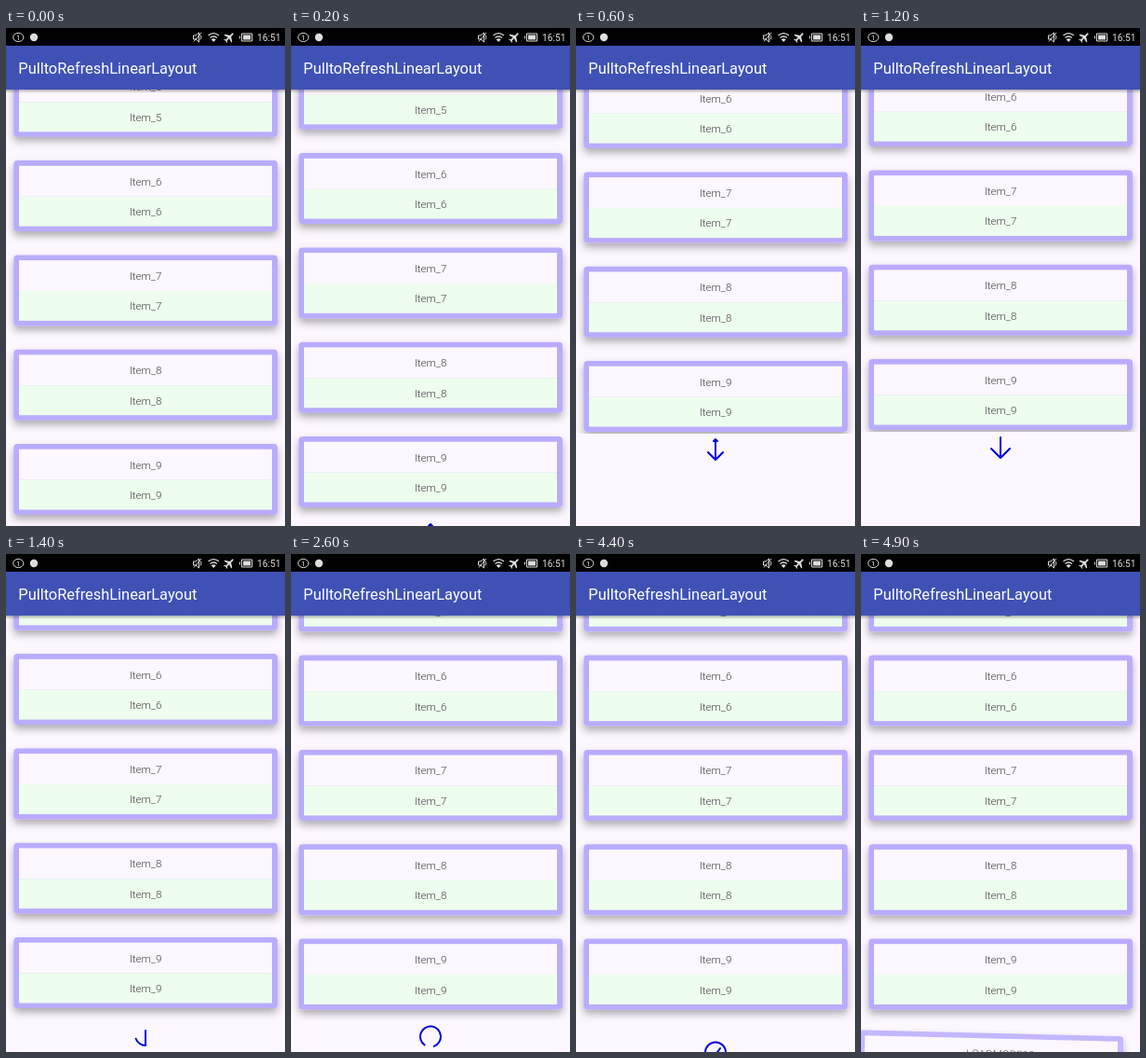
An HTML page that plays this animation: 300 px wide and 534 px high, repeating every 5 s.

```html
<!DOCTYPE html>
<html lang="en">
<head>
<meta charset="utf-8">
<title>Pull to load more</title>
<style>
  html, body { margin: 0; width: 100%; height: 100%; overflow: hidden; background: #fdf8ff; }
  svg { display: block; width: 100%; height: 100%; }
  text { font-family: Roboto, "Open Sans", sans-serif; }
  .item { font-size: 11.67px; font-weight: 300; fill: #444; text-anchor: middle; }
  .ink { fill: none; stroke: #0000dc; stroke-width: 2; stroke-linecap: round; stroke-linejoin: round; }
</style>
</head>
<body>
<svg viewBox="0 0 300 534">
  <defs>
    <filter id="cardShadow" x="-10%" y="-25%" width="120%" height="160%">
      <feDropShadow dx="0" dy="4.5" stdDeviation="4" flood-color="#000" flood-opacity=".32"/>
    </filter>
    <linearGradient id="barShadow" x2="0" y2="1">
      <stop stop-color="#000" stop-opacity=".3"/>
      <stop offset="1" stop-color="#000" stop-opacity="0"/>
    </linearGradient>
  </defs>
  <rect width="300" height="534" fill="#fdf8ff"/>
  <g id="list"></g>
  <g id="footer">
    <rect width="300" height="140" fill="#fdf8ff"/>
    <path id="mark" class="ink" transform="translate(150 17)"/>
  </g>

  <rect y="66" width="300" height="4" fill="url(#barShadow)"/>
  <rect y="19" width="300" height="47" fill="#3f51b5"/>
  <text x="13.3" y="49" font-size="16.4" fill="#fff">PulltoRefreshLinearLayout</text>

  <rect width="300" height="19" fill="#000"/>
  <g fill="none" stroke="#ddd">
    <ellipse cx="13.3" cy="10" rx="5.6" ry="4.6"/>
    <path d="M201.5 8h2.5l3.5-3v10l-3.5-3h-2.5zM209 7.5q2 2.500 0 5M202 14.500l8-9.500"/>
    <path d="M217.500 8q5.700-4.700 11.400 0M219.500 10.500q3.700-3 7.400 0" stroke-width="1.300"/>
    <path d="M253.500 6h11v8h-11zM251.500 8.500v3"/>
  </g>
  <g fill="#ddd">
    <circle cx="30" cy="10" r="4.200"/>
    <path d="M220.700 12.300q2.500-2 5 0l-2.500 2.700z"/>
    <path transform="translate(240 10) rotate(45)" d="M-.9-5.500Q0-7 .9-5.500V-2L5.500 1v1.300L.9 1v3l1.500 1.200v.8L0 5.300l-2.400.7v-.8L-.9 4V1l-4.600 1.300V1L-.9-2z"/>
    <rect x="255" y="7.500" width="8" height="5"/>
    <text x="13.300" y="13" font-size="8" text-anchor="middle">1</text>
    <text x="270" y="13.700" font-size="10.200">16:51</text>
  </g>
</svg>
<script>
const LOOP = 5000, STEP = 100, PITCH = 101.3, R = 11;
const FIRST = 5, LAST = 9;
const list = document.getElementById('list');
const footer = document.getElementById('footer');
const mark = document.getElementById('mark');

// Linear track through [time, value] points
function track(t, points) {
  if (t <= points[0][0]) return points[0][1];
  for (let i = 1; i < points.length; i++) {
    const [a, u] = points[i - 1], [b, v] = points[i];
    if (t <= b) return u + (v - u) * (t - a) / (b - a);
  }
  return points[points.length - 1][1];
}

function makeCard(label, both = true, textX = 150) {
  const card = document.createElementNS('http://www.w3.org/2000/svg', 'g');
  card.innerHTML = `
    <rect x="8.300" width="283.700" height="76" rx="4" fill="#b9acff" filter="url(#cardShadow)"/>
    <rect x="14" y="5.700" width="272" height="33" fill="#fdf7ff"/>
    <rect x="14" y="38.500" width="272" height="32" fill="#eefeee"/>
    <text class="item" x="${textX}" y="26.500">${label}</text>
    ${both ? `<text class="item" x="${textX}" y="59">${label}</text>` : ''}`;
  list.appendChild(card);
  return card;
}

const cards = [];
for (let n = FIRST; n <= LAST; n++) cards.push(makeCard('Item_' + n));
const newCard = makeCard('LOADMORE10', false, 160);
newCard.setAttribute('opacity', .85);

const scroll = [[100, 446], [200, 438], [300, 408], [400, 369.7], [500, 360], [600, 357],
  [700, 356], [1000, 355], [1200, 355], [1300, 390], [1400, 411], [1500, 412.5]];
const gap = [[200, 88], [400, 78], [1200, 78], [1400, 88]];
const flip = [[300, 0], [400, .1], [500, .5], [600, .8], [700, .95], [1000, 1]];
const arcHead = [[1200, 90], [1300, 110], [1400, 160], [1500, 215], [2600, 790], [3200, 1090]];
const arcTail = [[1500, 90], [2600, 485], [3200, 730]];

function polar(deg) {
  const a = deg * Math.PI / 180;
  return `${(R * Math.cos(a)).toFixed(2)} ${(R * Math.sin(a)).toFixed(2)}`;
}

function arc(from, to) {
  const mid = (from + to) / 2;
  return `M${polar(from)}A${R} ${R} 0 0 1 ${polar(mid)}A${R} ${R} 0 0 1 ${polar(to)}`;
}

// Arrowhead with its tip at the given height; dir 1 points down
function head(size, dir) {
  if (size <= 0) return '';
  const y = dir * (R - size);
  return `M${-size} ${y}L0 ${dir * R}L${size} ${y}`;
}

function arrow(t) {
  const k = track(t, flip);
  return `M0 ${-R}V${R}` + head(k < 1 ? 10 * (1 - k) : 0, -1) + head(10 * k, 1);
}

function morph(t) {
  const top = track(t, [[1200, -R], [1300, -9.5], [1400, -5], [1500, R]]);
  const barb = track(t, [[1200, 10], [1300, 4], [1400, 0]]);
  return `M0 ${top}V${R}` + head(barb, 1) + arc(90, track(t, arcHead));
}

function check(t) {
  const d = track(t, [[3330, 0], [3800, 1]]) * 15.6;
  if (d <= 0) return '';
  const a = Math.min(d / 5, 1), b = Math.max((d - 5) / 10.6, 0);
  return `M-4.500 .5l${3.500 * a} ${3.500 * a}` + (b > 0 ? `l${6 * b} ${-8.500 * b}` : '');
}

function markPath(t) {
  if (t <= 1200) return arrow(t);
  if (t < 1500) return morph(t);
  const ring = t < 3200 ? arc(track(t, arcTail), track(t, arcHead)) : arc(0, 360);
  return ring + check(t);
}

function draw(t) {
  const last = track(t, scroll);
  cards.forEach((card, i) => {
    const y = last - (LAST - FIRST - i) * PITCH;
    card.setAttribute('transform', `translate(0 ${y})`);
  });

  const drop = track(t, [[4200, 0], [4600, 34]]);
  footer.setAttribute('transform', `translate(0 ${last + track(t, gap) + drop})`);
  mark.setAttribute('d', markPath(t));

  const q = (4900 - t) / 600;
  const x = -10.5 - 320 * q * q;
  newCard.setAttribute('visibility', t >= 4400 ? 'visible' : 'hidden');
  newCard.setAttribute('transform',
    `translate(${x} ${last + PITCH}) rotate(${-x * .133} 150.200 38)`);
}

const start = performance.now();
let shown = -1;
function tick() {
  const t = Math.floor((performance.now() - start) % LOOP / STEP) * STEP;
  if (t !== shown) draw(shown = t);
  requestAnimationFrame(tick);
}
tick();
</script>
</body>
</html>
```
